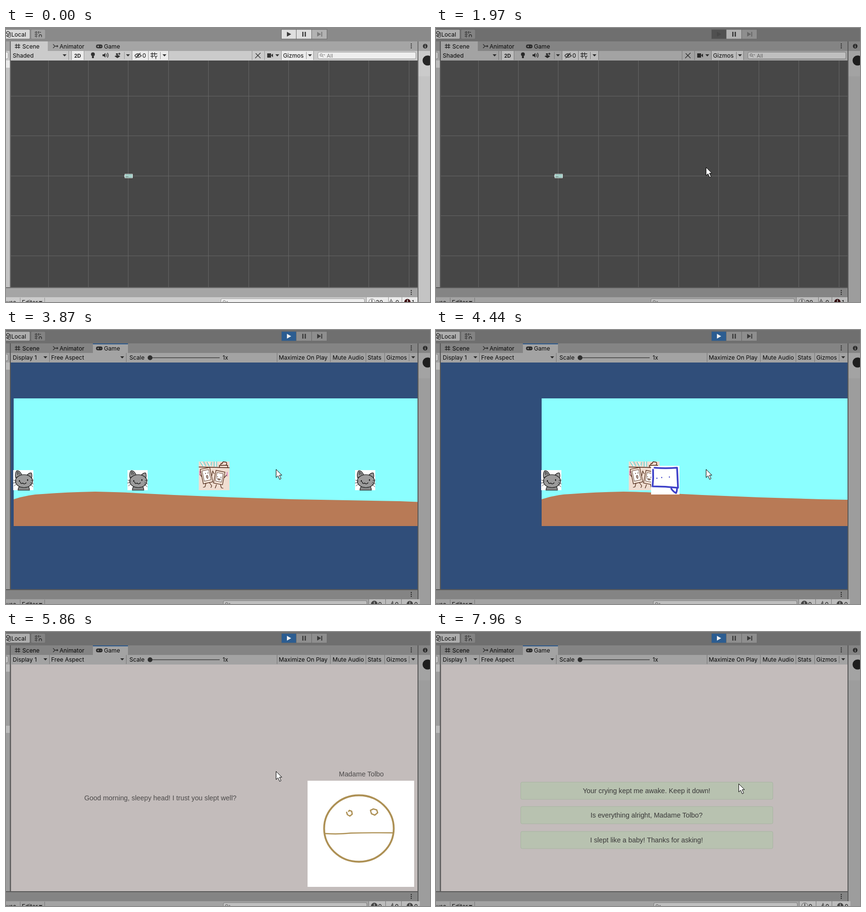
Write an HTML page that moves like this. It is 883 px wide and 573 px high and loops after 8000 ms.

```html
<!DOCTYPE html>
<html lang="en">
<head>
<meta charset="utf-8">
<title>Editor play mode</title>
<style>
html, body { margin: 0; width: 100%; height: 100%; overflow: hidden; background: #8a8a8a; }
svg { display: block; }
text { font: 12.1px Inter, sans-serif; fill: #080808; }
.ui text { font: 14.3px "Liberation Sans", Arial, sans-serif; fill: #393838; text-anchor: middle; }
.ui.fresh text { fill: #4c4a4a; }
.sep { stroke: #959595; fill: none; shape-rendering: crispEdges; }
.ico { stroke: #333; fill: none; stroke-width: 1.3; }
.dark { fill: #333; }
.lit { fill: #ebebeb; }
.field { fill: #eee; stroke: #999; }
</style>
</head>
<body>
<svg width="883" height="573" viewBox="0 0 883 573">
<defs>
  <path id="down" class="dark" d="M-4-2h8l-4 4.500z"/>
  <g id="kebab" class="dark"><circle cy="-4" r="1.200"/><circle r="1.200"/><circle cy="4" r="1.200"/></g>
  <g id="lens"><circle r="2.500" fill="none" stroke="#666"/><path d="M2 2l2.500 2.500M4.500-.5h3" stroke="#666"/></g>
  <g id="cat" stroke="#141414" stroke-width="1.100" fill="#9b9b9b" stroke-linecap="round">
    <path d="M0 0h42v42H0z" fill="#fff" stroke="none"/>
    <path d="M12 35q-2 3-2 7h24q0-4-2-8z" fill="#868686"/>
    <path d="M5 16Q3 5 8 1q6 0 10 9zM29 10q5-5 9-4 2 6 0 12z"/>
    <path d="M9 10q-2-4 0-7 4 3 5 6" fill="#777" stroke-width=".7"/>
    <ellipse cx="22.500" cy="23" rx="18" ry="13.500"/>
    <path d="M15 25q1 5 5 2 3 4 7-.500" fill="none" stroke-width="1.300"/>
    <path d="M13 22v1.500M30 20v1.500" stroke-width="2.200"/>
    <path d="M1 21l6 2M0 27l6-1M2 33l5-4M36 26l6 3M35 29l6 6M37 22l5-1" fill="none" stroke-width=".8"/>
  </g>
  <g id="bubble" fill="none" stroke="#3d40c8" stroke-width="3.600" stroke-linecap="round" stroke-linejoin="round">
    <path d="M0 0h59v60H0z" fill="#fff" stroke="none"/>
    <path d="M7 4q22 2 47 0 1 22 2 42-26-3-53-3Q5 26 4 8M42 48q5 7 10 9 2-4 2-10"/>
    <path d="M12 26h.1M22 24.500h.1M38 23.500h.1" stroke-width="2.400"/>
  </g>
  <clipPath id="view"><path d="M10 68h847v474H10z"/></clipPath>
</defs>

<!-- window chrome -->
<path fill="#8a8a8a" d="M0 0h883v573H0z"/>
<path fill="#a5a5a5" d="M0 28h883v20H0zM0 544h857v19H0z"/>
<path fill="#cbcbcb" d="M0 48h857v20H0zM859 48h24v53h-24zM0 563h857v10H0z"/>
<path fill="#c4c4c4" d="M0 68h8v475H0zM859 101h24v472h-24z"/>
<path class="lit" d="M0 68h8v15H0z"/>
<path id="row" class="lit" d="M0 196h8v15H0z"/>
<rect class="field" x="-20" y="50.500" width="24.500" height="14" rx="3"/>
<path fill="#6f6f6f" d="M8 28h2v516H8zM857 28h2v545h-2zM0 542h859v2H0z"/>

<rect x="-5" y="3" width="55" height="20" rx="2" fill="#d9d9d9" stroke="#777"/>
<rect x="52" y="3" width="30" height="20" rx="2" fill="#a3a3a3" stroke="#858585"/>
<path class="ico" d="M-1 10l5-3 5 3v5l-5 3-5-3zM-1 10l5 3 5-3M4 13v5"/>
<circle cx="7" cy="17" r="2.500" fill="#d9d9d9" stroke="#333"/>
<path class="ico" stroke-dasharray="2 1.500" d="M60 9h13M60 13h7M60 17h5M63 7v13M68 7v5"/>
<path class="ico" d="M69 19v-3q0-2 2.500-2t2.500 2v3" stroke-width="2"/>
<text x="11" y="18">Local</text>

<path id="tab" fill="#cbcbcb"/>
<path id="focus" fill="#3a72b0" d="M181 28h73v2h-73z"/>
<path class="ico" d="M21.500 33v10M26.500 33v10M18.500 36h11M18.500 40.500h11"/>
<text x="34" y="43">Scene</text>
<path class="ico" d="M98 34l4 4-4 4M102 38h6M106 36l2 2-2 2"/>
<text x="111.500" y="43">Animator</text>
<rect class="dark" x="187.500" y="34.500" width="13.500" height="8" rx="4"/>
<path d="M190 38.500h4M192 36.500v4M196.500 38.500h2" stroke="#c0c0c0"/>
<text x="204" y="43">Game</text>
<use href="#kebab" x="844" y="37.500"/>
<use href="#kebab" x="844" y="553"/>
<circle class="dark" cx="873" cy="38" r="4.800"/>
<path d="M873 35v1.300M873 37.500v3.500" stroke="#ccc" stroke-width="1.500"/>
<circle cx="878" cy="68" r="10.500" fill="#262626"/>

<g id="sceneBar">
  <path class="lit" d="M137 48h25v19h-25zM263 48h75v19h-75zM574 48h66v19h-66z"/>
  <path class="sep" d="M130.500 48v19M136.500 48v19M162.500 48v19M246.500 50v15M262.500 48v19M296.500 48v19M321.500 50v15M338.500 48v19M512.500 48v19M538.500 48v19M573.500 48v19M625.500 50v15M640.500 48v19"/>
  <text x="14" y="62">Shaded</text>
  <text x="142" y="61.500" style="font-size:10.500px;font-weight:600">2D</text>
  <circle class="dark" cx="181" cy="55" r="4"/><path class="dark" d="M179 59h4v4h-4z"/>
  <path class="dark" d="M201 55h3l3-3v10l-3-3h-3z"/><path class="ico" d="M209 54q2 3 0 6M211 52q4 5 0 10"/>
  <path class="dark" d="M226 59l6-3 6 3-6 4zM229 53h4v3h-4zM236 51l1 2 2 1-2 1-1 2-1-2-2-1 2-1z"/>
  <path class="ico" d="M268 58q6-8 14 0-7 7-14 0M270 63l10-11"/><circle class="dark" cx="275" cy="57.500" r="2"/>
  <text x="284" y="62">0</text>
  <path class="ico" d="M304.500 51v12M309.500 51v7M301 54h14M301 59h7M309 58l3 3 3-3M312 61v4"/>
  <path class="ico" stroke-width="2" d="M520 53l10 10M530 52l-11 11"/>
  <path class="dark" d="M544 53h8v9h-8zM552 57l4-3.500v8z"/>
  <text x="577" y="62">Gizmos</text>
  <rect class="field" x="649.500" y="50.500" width="204" height="14" rx="3"/>
  <use href="#lens" x="656.500" y="56.500"/>
  <text x="668" y="61.500" style="font-size:11px;fill:#777">All</text>
  <use href="#down" x="122" y="57"/><use href="#down" x="254" y="57"/><use href="#down" x="330" y="57"/>
  <use href="#down" x="565" y="57"/><use href="#down" x="633" y="57"/>
</g>

<g id="gameBar">
  <path class="sep" d="M90.500 48v19M250.500 48v19M564.500 48v19M675.500 48v19M749.500 48v19M788.500 48v19M839.500 50v15"/>
  <text x="14" y="62">Display 1</text><text x="94" y="62">Free Aspect</text>
  <text x="257" y="62">Scale</text><text x="451" y="62">1x</text>
  <text x="568" y="62">Maximize On Play</text><text x="680" y="62">Mute Audio</text>
  <text x="753" y="62">Stats</text><text x="792" y="62">Gizmos</text>
  <path d="M300 58h145" stroke="#555" stroke-width="1.500"/><circle cx="300" cy="58" r="5" fill="#3a3a3a"/>
  <use href="#down" x="82" y="57"/><use href="#down" x="242" y="57"/><use href="#down" x="848" y="57"/>
</g>

<!-- console strip -->
<text x="-6" y="577.500">ause</text><text x="33" y="577.500">Editor</text>
<use href="#down" x="72" y="573"/>
<path class="sep" d="M29.500 564v9M80.500 564v9"/>
<g id="console">
  <rect class="field" x="447.500" y="566" width="299" height="14" rx="3"/>
  <use href="#lens" x="454.500" y="572.500"/>
  <path class="lit" d="M751 563h106v10H751z"/>
  <path id="conSep" class="sep"/>
  <circle id="info" cx="762" cy="573" r="6.500" stroke="#555" stroke-width=".8"/>
  <path id="warn" d="M802 566l6 12h-12z" fill="#777"/>
  <circle id="fail" cx="836" cy="573" r="6.500"/>
  <path d="M762 568v6M802 570v4M836 568v6" stroke="#ddd" stroke-width="1.600"/>
  <path id="infoMark" d="M762 568v6" stroke="#555" stroke-width="1.600"/>
  <text id="n0" x="770" y="577.500"></text><text id="n1" x="811" y="577.500">0</text><text id="n2" x="845" y="577.500"></text>
</g>

<path id="tint" fill-opacity=".2" fill-rule="evenodd" d="M0 0h883v573H0zM10 68h847v474H10z"/>

<g stroke="#6a6a6a">
  <rect id="b0" x="573.500" y="3" width="31" height="20"/>
  <rect id="b1" x="604.500" y="3" width="32" height="20"/>
  <rect id="b2" x="636.500" y="3" width="32" height="20"/>
</g>
<path id="i0" d="M585 8l9 5-9 5z"/>
<path id="i1" d="M617 8h2.500v10H617zM622 8h2.500v10H622z"/>
<path id="i2" d="M648 8l8 5-8 5zM656.500 8h2v10h-2z"/>

<!-- viewport -->
<g clip-path="url(#view)">
  <g id="scene">
    <path fill="#474747" d="M10 68h847v474H10z"/>
    <path id="grid" stroke="#656565" shape-rendering="crispEdges"/>
    <path fill="#86b9b0" stroke="#dcdcdc" d="M247.500 305.500h16v8h-16z"/>
    <path d="M246 309.500h18" stroke="#e4fffa" stroke-width="1.500"/>
    <path d="M249 311h6" stroke="#55625f"/>
  </g>
  <g id="game">
    <path fill="#304e7a" d="M10 68h847v474H10z"/>
    <g id="world">
      <path fill="#8bffff" d="M0 0h1100v267H0z"/>
      <path fill="#b87a56" d="M0 211Q30 201 60 200Q110 196 170 195Q225 196 254 198L334 202 454 207 584 211 694 213 804 215 921 220 1100 224V267H0z"/>
    </g>
    <g transform="translate(401.500 275)" fill="none" stroke="#4a2412" stroke-width="1.200">
      <path d="M0 0h64v60H0z" fill="#f0ddd1" stroke="none"/>
      <path d="M3 1l6 9M10 0l5 10M17 1l5 9M27 1l-2 9M32 0v11M37 0v11" stroke="#7fd8d4" stroke-width="2.200"/>
      <path d="M5 1l6 9M20 1l5 9M35 0v11" stroke="#fff"/>
      <path d="M0 11.500l64 1.500M43 13V8h17v5M46 8q-1-5 3-4 1-5 5-3 5 0 4 4l-1 3" stroke-width="1.500"/>
      <g transform="rotate(-12 16 29)"><path d="M6 14h20v31H6z" fill="#f3e3d7"/><path d="M9 18h14v22H9z" fill="#fff" stroke-width=".8"/></g>
      <g transform="rotate(11 42 34)"><path d="M33 20h19v27H33z" fill="#f3e3d7"/><path d="M36 24h13v18H36z" fill="#fff" stroke-width=".8"/></g>
      <path d="M14 24v2M19 23v2M16 30q3-2 3 3t-3 0zM39 31v2M46 32v2M39 36q3 5 6 1zM6 32l-4-6 1-5M27 30l2-10 3 6M53 34l5-6M15 45l-2 8-4 1M22 44l5 7-2 4M37 48l-3 8M45 48l2 7 4 1"/>
      <path d="M2 19v10M59 22v9" stroke="#d884b8" stroke-width="2"/>
    </g>
    <g id="cats"></g>
  </g>
  <g id="talk" class="ui">
    <path fill="#c3bcbb" d="M10 68h847v474H10z"/>
    <path d="M10.500 68v474" stroke="#999493"/>
    <g id="line">
      <text x="321.500" y="351.500">Good morning, sleepy head! I trust you slept well?</text>
      <text x="740" y="301.500">Madame Tolbo</text>
      <path fill="#fff" d="M628 311h222v222H628z"/>
      <g fill="none" stroke="#ad9054" stroke-width="3.800" stroke-linejoin="round">
        <ellipse cx="735" cy="411" rx="72.500" ry="69.500"/>
        <path stroke-width="2.400" d="M664 421.500q28 2 54-1 40-1 88-.5"/>
        <path stroke-width="2.600" d="M709 376l2 6 5 3 5-4-1-6-5-2-2 3M759 373l2 7 7 3 6-5-2-6-7-2z"/>
      </g>
    </g>
    <g id="choices"></g>
  </g>
</g>
<path id="cursor" d="M.5.5v17l4-3.700 3.300 7.500 3-1.400-3.300-7.200h5z" fill="#fff" stroke="#000"/>
</svg>
<script>
const $ = id => document.getElementById(id);
const show = (id, on) => { $(id).style.display = on ? '' : 'none'; };
const fill = (id, color) => $(id).setAttribute('fill', color);
const move = (el, x, y) => el.setAttribute('transform', `translate(${x} ${y})`);
const snap = (t, origin, step) => origin + Math.floor((t - origin) / step) * step;

const LOOP = 8000, PRESS = 1290, GAME = 3250, RUN = 3390, TALK = 5860, CHOOSE = 6730;

// [time, x, y]
const mouse = [
  [70, 814, 537], [270, 705, 430], [470, 575, 225], [610, 517, 95], [750, 566, 14], [816, 575, 8],
  [884, 570, 2], [951, 582, 13], [1087, 576, 10], [1287, 576, 10], [1420, 569, 110], [1630, 559, 297],
  [1898, 559, 297], [1968, 562, 291], [6730, 562, 291], [7050, 605, 253], [7350, 650, 265],
  [7798, 650, 265], [7866, 642, 287], [7933, 630, 317]
];
// [time, left edge]
const walk = [[3646, -64], [3870, 16], [4440, 220], [4867, 335], [4932, 358], [5000, 385]];

function track(keys, t, i) {
  if (t <= keys[0][0]) return keys[0][i];
  const n = keys.findIndex(k => k[0] > t);
  if (n < 0) return keys[keys.length - 1][i];
  const a = keys[n - 1], b = keys[n];
  return a[i] + (b[i] - a[i]) * (t - a[0]) / (b[0] - a[0]);
}

// grid, cats and answer buttons
let d = '';
for (let i = 0; i < 10; i++) d += `M${Math.floor(88 + i * 83.45) + .5} 68v474`;
for (let i = 0; i < 5; i++) d += `M10 ${Math.floor(142 + i * 83.5) + .5}h847`;
$('grid').setAttribute('d', d);

const spots = [-1, 237, 711];
$('cats').innerHTML = spots.map(() => '<g><use href="#cat"/><use href="#bubble" x="-9" y="-9"/></g>').join('');
const cats = [...$('cats').children];

$('choices').innerHTML = [
  'Your crying kept me awake. Keep it down!',
  'Is everything alright, Madame Tolbo?',
  'I slept like a baby! Thanks for asking!'
].map((s, i) => {
  const y = 314 + Math.round(i * 51.4);
  return `<rect x="176.500" y="${y}" width="525" height="36" rx="3" fill="#b8c2b0" stroke="#a8b5a2"/>
    <text x="438.500" y="${y + 23}">${s}</text>`;
}).join('');

const looks = {
  edit: ['#dfdfdf', '#dfdfdf', '#b2b2b2', '#3c3c3c', '#3c3c3c', '#7b7b7b'],
  wait: ['#505050', '#b2b2b2', '#8e8e8e', '#474747', '#333', '#666'],
  run: ['#2c5d91', '#8e8e8e', '#8e8e8e', '#f0f0f0', '#3a3a3a', '#3a3a3a']
};

function drawConsole(t) {
  const before = t < GAME, after = t >= CHOOSE;
  move($('console'), before ? 0 : after ? 6 : 5, 0);
  $('conSep').setAttribute('d', before ? 'M750.500 563v10M796.500 563v10M824.500 563v10' : 'M750.500 563v10M785.500 563v10M818.500 563v10');
  const slide = before ? 0 : -6;
  move($('warn'), slide / 3, 0);
  move($('n1'), slide, 0);
  fill('info', before || after ? '#f2f2f2' : '#555');
  show('infoMark', before || after);
  fill('fail', before ? '#3d0d10' : '#555');
  $('n0').textContent = before ? '20' : '0';
  $('n2').textContent = before ? '1' : '0';
}

function drawGame(t) {
  const s = snap(t, 3870, 71.25);
  const edge = track(walk, s, 1);
  const drop = 231 * Math.max(0, (s - RUN) / 1000) ** 2;
  const top = 156 - Math.min(13, drop);
  move($('world'), edge, top);
  cats.forEach((cat, i) => {
    const x = edge + spots[i];
    const near = x + 42 > 401 && x < 465;
    move(cat, x, top + 113 + Math.min(37, drop));
    cat.children[0].style.display = near ? 'none' : '';
    cat.children[1].style.display = near ? '' : 'none';
  });
}

function draw(t) {
  const inScene = t < GAME, talking = t >= TALK;
  show('scene', inScene);
  show('sceneBar', inScene);
  show('gameBar', !inScene);
  show('focus', !inScene);
  show('game', !inScene && !talking);
  show('talk', talking);
  show('row', talking);
  show('line', t < CHOOSE);
  show('choices', t >= CHOOSE);
  show('tint', t >= PRESS);
  $('talk').classList.toggle('fresh', t < TALK + 60);
  $('tab').setAttribute('d', inScene ? 'M10 28h77v20H10z' : 'M181 28h73v20h-73z');

  const look = looks[t < PRESS ? 'edit' : t < RUN ? 'wait' : 'run'];
  for (let i = 0; i < 3; i++) {
    fill('b' + i, look[i]);
    fill('i' + i, look[i + 3]);
  }
  drawConsole(t);
  if (!inScene && !talking) drawGame(t);

  show('cursor', t >= 70);
  const m = snap(t, 70, 67.8);
  move($('cursor'), track(mouse, m, 1), track(mouse, m, 2));
}

function frame() {
  draw(performance.now() % LOOP);
  requestAnimationFrame(frame);
}
frame();
</script>
</body>
</html>
```
